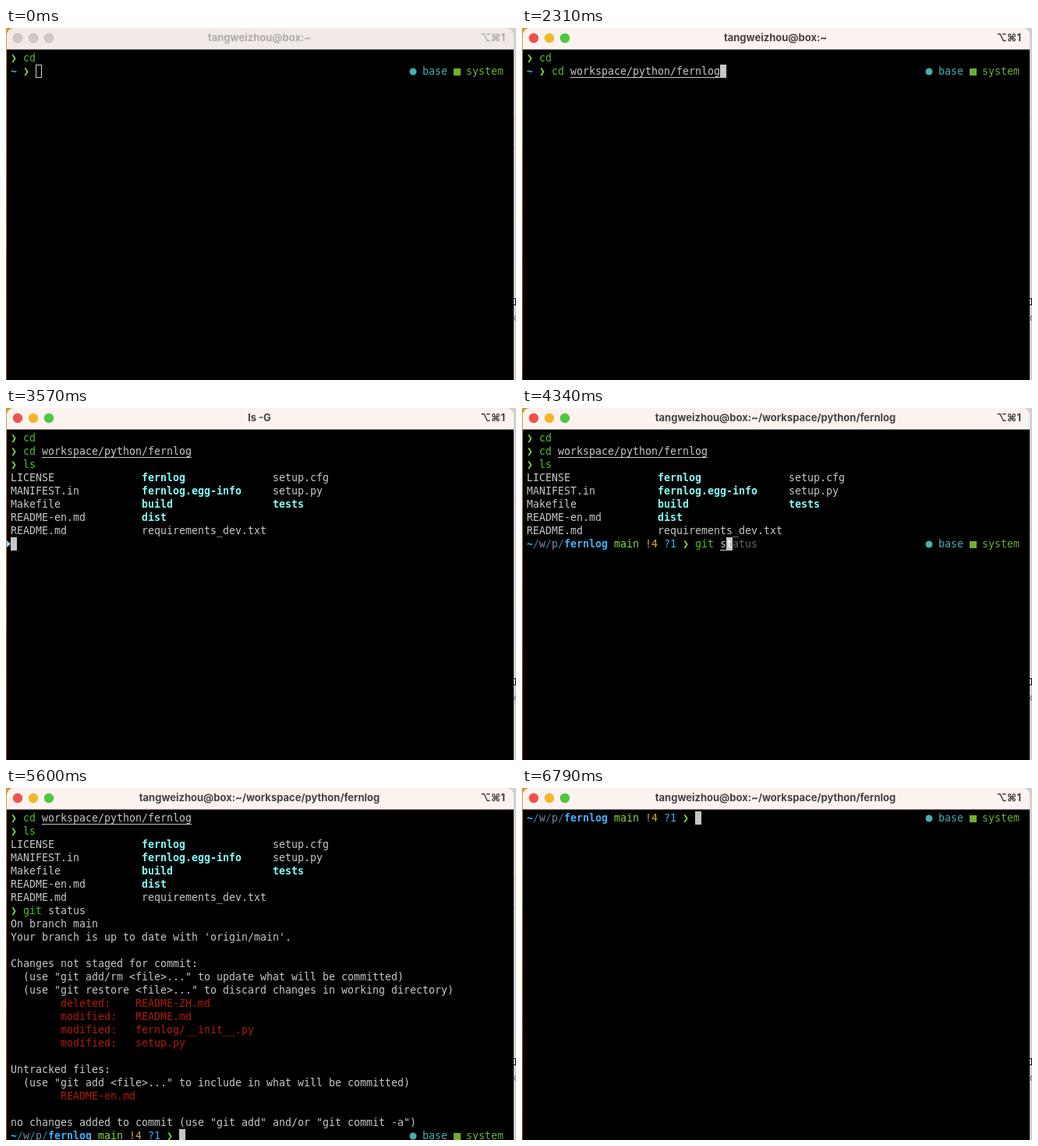
An HTML page with a canvas for the animation above (8330 ms loop, 654 px wide and 452 px high).

```html
<!DOCTYPE html>
<html lang="en">
<head>
<meta charset="utf-8">
<title>Terminal session</title>
<style>
html, body { margin: 0; width: 100%; height: 100%; overflow: hidden; background: #000; }
canvas { display: block; }
</style>
</head>
<body>
<canvas id="stage" width="654" height="452"></canvas>
<script>
const ctx = document.getElementById('stage').getContext('2d');
const LOOP = 8330, CELL = 8, ROW = 17, LEFT = 6, TOP = 30, LAST_ROW = 24;
const MONO = '13.29px "DejaVu Sans Mono", monospace';
const SANS = '13px Inter, sans-serif';

// Text markup: ^x switches to style x.
const STYLES = {
  w: { color: '#c7c7c7' },
  u: { color: '#c7c7c7', line: true },
  p: { color: '#82dc3c' },
  g: { color: '#4fc026' },
  r: { color: '#b01a0c' },
  x: { color: '#c8281a', bold: true },
  d: { color: '#84fcfb', bold: true },
  h: { color: '#666666' },
  t: { color: '#42b0f4' },
  s: { color: '#3585aa' },
  k: { color: '#8787ac' },
  a: { color: '#42b0f4', bold: true },
  y: { color: '#d2ae32' },
  b: { color: '#44b0aa' },
  n: { color: '#70b030' }
};

const PATH = 'workspace/python/fernlog';
const HOST = 'tangweizhou@box:~';
const HOME = '^a~ ^p❯ ';
const DIR = '^a~^s/^kw^s/^kp^s/^afernlog ';
const REPO = DIR + '^pmain ^y!4 ^t?1 ^p❯ ';

const listing = [
  ['LICENSE', '^dfernlog', 'setup.cfg'],
  ['MANIFEST.in', '^dfernlog.egg-info', 'setup.py'],
  ['Makefile', '^dbuild', '^dtests'],
  ['README-en.md', '^ddist', ''],
  ['README.md', 'requirements_dev.txt', '']
].map(cols => cols.map(c => {
  const text = c.replace('^d', '');
  return (c === text ? '^w' : '^d') + text.padEnd(21);
}).join(''));

const status = `On branch main
Your branch is up to date with 'origin/main'.

Changes not staged for commit:
  (use "git add/rm <file>..." to update what will be committed)
  (use "git restore <file>..." to discard changes in working directory)
^r        deleted:    README-ZH.md
^r        modified:   README.md
^r        modified:   fernlog/__init__.py
^r        modified:   setup.py

Untracked files:
  (use "git add <file>..." to include in what will be committed)
^r        README-en.md

no changes added to commit (use "git add" and/or "git commit -a")`.split('\n');

const atHome = ['^p❯ ^gcd'];
const afterCd = [...atHome, '^p❯ ^gcd ^u' + PATH];
const afterLs = [...afterCd, '^p❯ ^gls'];
const listed = [...afterLs, ...listing];
const afterGit = [...listed, '^p❯ ^ggit ^wstatus'];
const reported = [...afterGit, ...status];

const type = (input, ghost = '') => ({ input, ghost });
const run = (lines, title) => ({ lines, title, prompt: '', input: '', ghost: '' });

// Each step changes part of the state from its time on.
const steps = [
  [0, { lines: atHome, title: HOST, prompt: HOME, input: '', ghost: '', active: false, solid: false, marks: 0 }],
  [560, { active: true }],
  [630, { solid: true }],
  [910, type('^xc')],
  [980, type('^xc', 'd ' + PATH + '/tests')],
  [1400, type('^gcd', ' ' + PATH + '/tests')],
  [1540, type('^gcd ', PATH + '/tests')],
  [1680, type('^gcd ^uw', PATH.slice(1) + '/tests')],
  [1820, type('^gcd ^uw', PATH.slice(1))],
  [2310, type('^gcd ^u' + PATH)],
  [2450, run(afterCd, 'cd ' + PATH)],
  [2520, { title: HOST + '/' + PATH, prompt: DIR + '^p❯ ' }],
  [2660, { prompt: REPO }],
  [2870, type('^xl', 's')],
  [3010, type('^gls')],
  [3430, run(afterLs, HOST + '/' + PATH)],
  [3570, run(listed, 'ls -G')],
  [3640, { title: HOST + '/' + PATH, prompt: DIR + '^p❯ ' }],
  [3710, { prompt: REPO }],
  [3850, type('^xg', 'it status')],
  [3990, type('^xgi', 't status')],
  [4060, type('^ggit', ' status')],
  [4200, type('^ggit ', 'status')],
  [4340, type('^ggit ^us', 'tatus')],
  [4410, type('^ggit ^ust', 'atus')],
  [4550, type('^ggit ^wsta', 'tus')],
  [4690, type('^ggit ^wstatus')],
  [4900, run(afterGit, HOST + '/' + PATH)],
  [5040, { ...run(reported, 'git status'), marks: 1 }],
  [5110, { title: HOST + '/' + PATH, prompt: DIR + '^p❯ ' }],
  [5250, { prompt: REPO }],
  [5530, { marks: .5 }],
  [5600, { marks: 0 }],
  [5880, type('^xc', 'd ' + PATH)],
  [6020, type('^xcl', 'ear')],
  [6160, type('^xcle', 'ar')],
  [6300, type('^xclea', 'r')],
  [6370, type('^gclear')],
  [6580, run([...reported, '^p❯ ^gclear'], 'clear')],
  [6650, run([], 'clear')],
  [6720, { title: HOST + '/' + PATH, prompt: DIR + '^p❯ ' }],
  [6790, { prompt: REPO }]
];

function rect(color, x, y, w, h) {
  ctx.fillStyle = color;
  ctx.fillRect(x, y, w, h);
}

function dot(color, x, y, r) {
  ctx.fillStyle = color;
  ctx.beginPath();
  ctx.arc(x, y, r, 0, 7);
  ctx.fill();
}

// Writes marked-up text on the character grid; returns the next column.
function write(text, row, col = 0) {
  let style = STYLES.w;
  const y = TOP + row * ROW;
  for (let i = 0; i < text.length; i++) {
    if (text[i] === '^') {
      style = STYLES[text[++i]];
      continue;
    }
    const x = LEFT + CELL * col++;
    ctx.font = (style.bold ? 'bold ' : '') + MONO;
    ctx.fillStyle = style.color;
    ctx.fillText(text[i], x, y + 13);
    if (style.line) ctx.fillRect(x, y + 16, CELL, 1);
  }
  return col;
}

function drawWindow({ active, title }) {
  const edge = ctx.createLinearGradient(0, 0, 0, 452);
  edge.addColorStop(0, '#d89a30');
  edge.addColorStop(.5, '#b86c14');
  edge.addColorStop(1, '#9c4c12');
  rect(edge, 0, 0, 40, 452);
  rect('#d0d0d0', 600, 0, 54, 452);
  rect('#bcbcbc', 651, 116, 3, 1);
  rect('#bcbcbc', 651, 154, 3, 1);
  ctx.strokeStyle = '#111';
  ctx.strokeRect(648.5, 347.5, 5, 8);
  ctx.font = '12px Inter, sans-serif';
  ctx.fillStyle = '#666';
  ctx.fillText('c', 651, 376);

  rect('#000', 1, 27, 650, 425);
  ctx.fillStyle = active ? '#fcf3f0' : '#f2eae7';
  ctx.beginPath();
  ctx.roundRect(1, 0, 650, 27, [9, 9, 0, 0]);
  ctx.fill();
  rect('#8c8684', 1, 27, 650, 1);

  const lights = active ? ['#ee5350', '#f3b62e', '#50c840'] : Array(3).fill('#d0c9c7');
  lights.forEach((color, i) => {
    dot(active ? color : '#bdb6b4', 15 + 20 * i, 13, 6.2);
    dot(color, 15 + 20 * i, 13, 5.4);
  });

  ctx.font = 'bold ' + SANS;
  ctx.fillStyle = active ? '#454140' : '#b0aaa8';
  ctx.textAlign = 'center';
  ctx.fillText(title, 325, 17);
  ctx.textAlign = 'right';
  ctx.fillText('⌥⌘1', 640, 16.5);
  ctx.textAlign = 'left';
}

function drawPrompt({ prompt, input, ghost, solid }, row) {
  const y = TOP + row * ROW;
  if (prompt) {
    dot(STYLES.b.color, 522, y + 9, 4.5);
    write('^bbase', row, 66);
    rect(STYLES.n.color, 574, y + 5, 9, 9);
    write('^nsystem', row, 73);
  } else {
    ctx.fillStyle = '#8fdcf4';
    ctx.beginPath();
    ctx.moveTo(1, y + 4);
    ctx.lineTo(6, y + 8.5);
    ctx.lineTo(1, y + 13);
    ctx.fill();
  }
  const col = write(prompt + input, row);
  const x = LEFT + CELL * col;
  write('^h' + ghost, row, col);
  if (solid) {
    rect('#c7c7c7', x, y, CELL, ROW);
    ctx.font = MONO;
    ctx.fillStyle = '#fff';
    ctx.fillText(ghost.charAt(0), x, y + 13);
  } else {
    ctx.strokeStyle = '#d0d0d0';
    ctx.strokeRect(x + .5, y + .5, CELL - 1, ROW - 1);
  }
}

function draw(time) {
  const state = {};
  for (const [at, change] of steps) if (at <= time) Object.assign(state, change);
  drawWindow(state);

  const { lines, marks } = state;
  const scroll = Math.max(0, lines.length - LAST_ROW);
  lines.slice(scroll).forEach((line, row) => write(line, row));
  drawPrompt(state, lines.length - scroll);

  ctx.globalAlpha = marks;
  for (const y of [47, 64, 165]) rect('#8c8c8c', 640, y, 11, 2);
  if (state.prompt) rect('#8c8c8c', 640, 437, 11, 2);
  ctx.globalAlpha = 1;
}

const start = performance.now();
function tick() {
  draw((performance.now() - start) % LOOP);
  requestAnimationFrame(tick);
}
tick();
</script>
</body>
</html>
```
